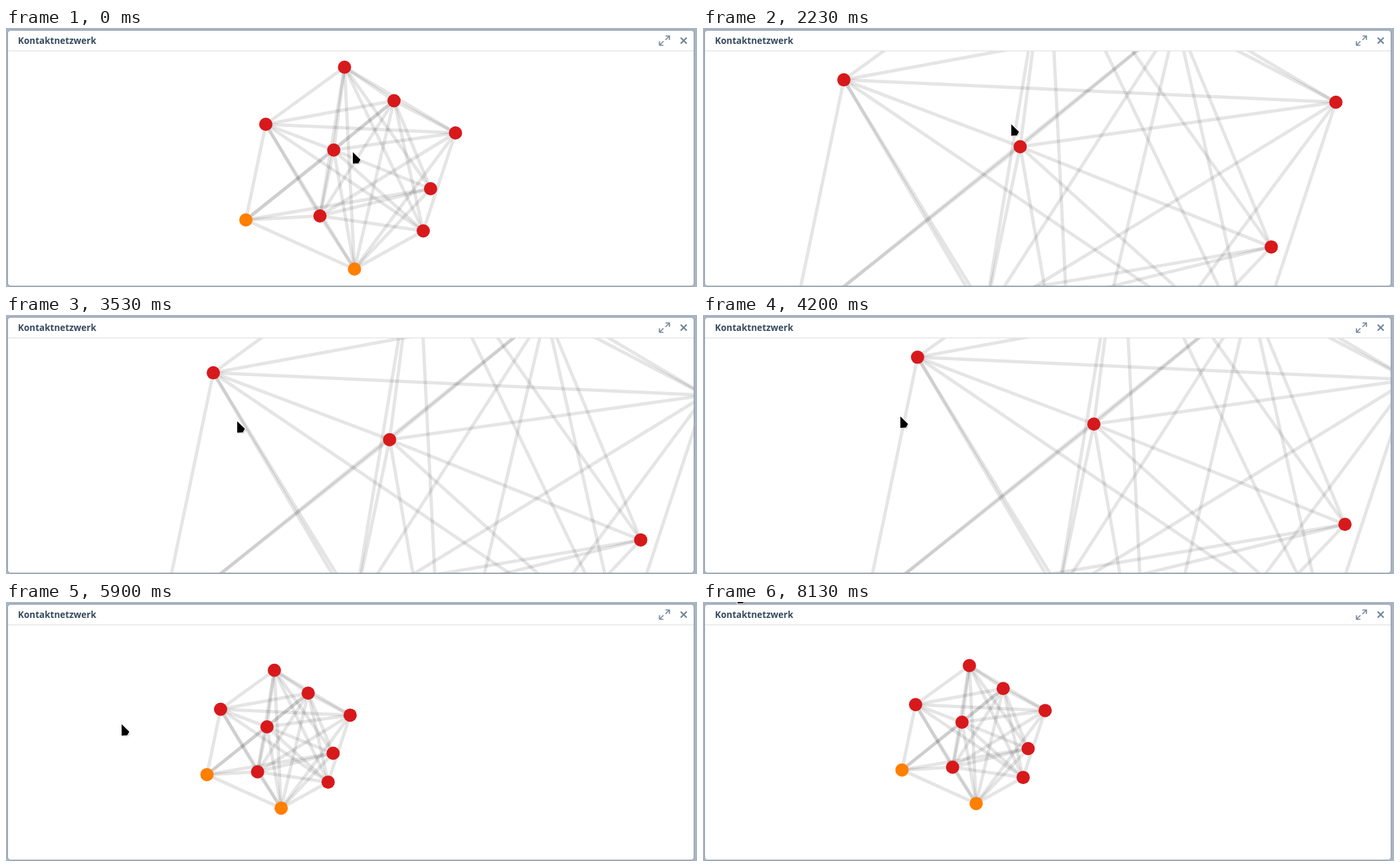
These frames come from a looping animation (1040 px wide and 390 px high, 8310 ms). An HTML page with a canvas:

```html
<!DOCTYPE html>
<html lang="de">
<head>
<meta charset="utf-8">
<title>Kontaktnetzwerk</title>
<style>
  html, body { margin: 0; width: 100%; height: 100%; overflow: hidden; background: #a9b4c2; }
  #stage { position: relative; width: 1040px; height: 390px; overflow: hidden; background: #a9b4c2; }
  #panel {
    position: absolute; left: 2px; top: 3px; width: 1032px; height: 384px;
    border: 1px solid #8f9bab; border-radius: 5px; background: #fff;
  }
  #title {
    position: absolute; left: 18px; top: 10px; white-space: nowrap;
    font: bold 13.5px/18px "Open Sans", "Noto Sans", sans-serif; color: #34495e;
  }
  #rule { position: absolute; left: 3px; top: 34px; width: 1032px; height: 1px; background: #dcdcdc; }
  #graph { position: absolute; left: 3px; top: 35px; }
  #icons { position: absolute; left: 980px; top: 8px; }
  #cursor { position: absolute; left: -2px; top: -2px; overflow: visible; }
</style>
</head>
<body>
<div id="stage">
  <div id="panel"></div>
  <div id="title">Kontaktnetzwerk</div>
  <div id="rule"></div>
  <canvas id="graph" width="1032" height="353"></canvas>
  <svg id="icons" width="50" height="22" fill="none" stroke="#73879c">
    <path d="M12.5 4H18.5V10M18 4.5L12.5 10M3.5 12V18H9.5M4 17.5L9.5 12" stroke-width="1.7"/>
    <path d="M35.5 6.5L44.5 15.5M44.5 6.5L35.5 15.5" stroke-width="2.3"/>
  </svg>
  <svg id="cursor" width="18" height="24">
    <path d="M3.5 4L15 15L12 20.5L3.5 21Z" opacity=".2"/>
    <path d="M2 2L13.5 13.2L10.5 18.8L2 19.2Z" stroke="#fff" stroke-width="2" paint-order="stroke"/>
  </svg>
</div>
<script>
const LOOP = 8310, RED = '#d7191c', ORANGE = '#ff7f00';
const nodes = [
  [509.5, 59], [584, 109.5], [676.5, 158], [391, 145], [493.3, 183.8],
  [639, 242], [472.5, 283], [628, 305.5], [361, 289], [524.5, 363]
];

// Every pair is linked except these.
const unlinked = new Set(['2-5', '5-7', '3-5', '0-8', '2-8', '7-8']);
const edges = nodes.flatMap((_, a) => nodes.map((_, b) => [a, b]))
  .filter(([a, b]) => a < b && !unlinked.has(a + '-' + b));

// Pointer position and graph transform after all gestures up to time t.
function stateAt(t) {
  const pointer = { x: 522, y: 187 }, view = { scale: 1, x: 0, y: 0 };

  const progress = (start, end) => {
    if (t < start) return 0;
    if (t >= end) return 1;
    const p = (t - start) / (end - start);
    return p * p * (3 - 2 * p);
  };
  const point = (start, end, x, y) => {
    const p = progress(start, end);
    pointer.x += (x - pointer.x) * p;
    pointer.y += (y - pointer.y) * p;
  };
  const drag = (start, end, dx, dy) => {
    const p = progress(start, end);
    view.x += dx * p;
    view.y += dy * p;
  };
  // Wheel notches, evenly spaced, around a fixed point.
  const zoom = (start, gap, notches, power, x, y) => {
    const done = Math.max(0, Math.min(notches, Math.floor((t - start) / gap) + 1));
    const factor = 1.1 ** (power * done);
    view.scale *= factor;
    view.x = x + (view.x - x) * factor;
    view.y = y + (view.y - y) * factor;
  };

  point(260, 530, 2, 280);
  point(530, 830, 483, 280);
  point(970, 970, 8, 150);
  point(1400, 1400, 464, 145);
  zoom(1400, 100, 3, 2, 503.3, 187);
  zoom(1770, 53, 4, 1, 503.3, 187);

  point(2230, 2900, 279, 93);
  drag(2230, 2900, -191, -25);
  point(3060, 3300, 520, 140);
  point(3300, 3530, 348, 160);
  drag(3060, 3530, 291, 34);
  point(3970, 4500, 222, 142);
  drag(3970, 4500, 27, -58);

  zoom(4670, 50, 3, -2, 433, 145);
  zoom(4830, 70, 2, -2, 380, 158.4);
  zoom(5100, 1, 1, -4, 350, 155);

  point(5570, 5900, 174, 184);
  drag(5570, 5900, -47.5, 41);
  drag(5930, 6100, -3, -7);
  point(5930, 6400, 87, 54);
  point(6430, 6530, 1018, 16);
  point(6530, 6670, 55, -26);
  point(8070, 8130, 52, -15);
  return { pointer, view };
}

const ctx = document.getElementById('graph').getContext('2d');
const cursor = document.getElementById('cursor');

function draw(t) {
  const { pointer, view } = stateAt(t);
  const points = nodes.map(([x, y]) => [view.x + x * view.scale, view.y + y * view.scale]);

  ctx.setTransform(1, 0, 0, 1, -3, -35);
  ctx.clearRect(0, 0, 1040, 390);
  ctx.lineWidth = 5;
  ctx.strokeStyle = 'rgba(0,0,0,.1)';
  for (const [a, b] of edges) {
    ctx.beginPath();
    ctx.moveTo(...points[a]);
    ctx.lineTo(...points[b]);
    ctx.stroke();
  }
  points.forEach(([x, y], i) => {
    ctx.fillStyle = i < 8 ? RED : ORANGE;
    ctx.beginPath();
    ctx.arc(x, y, 10, 0, 2 * Math.PI);
    ctx.fill();
  });
  cursor.style.transform = `translate(${pointer.x}px, ${pointer.y}px)`;
}

const began = performance.now();
function tick() {
  draw((performance.now() - began) % LOOP);
  requestAnimationFrame(tick);
}
tick();
</script>
</body>
</html>
```
